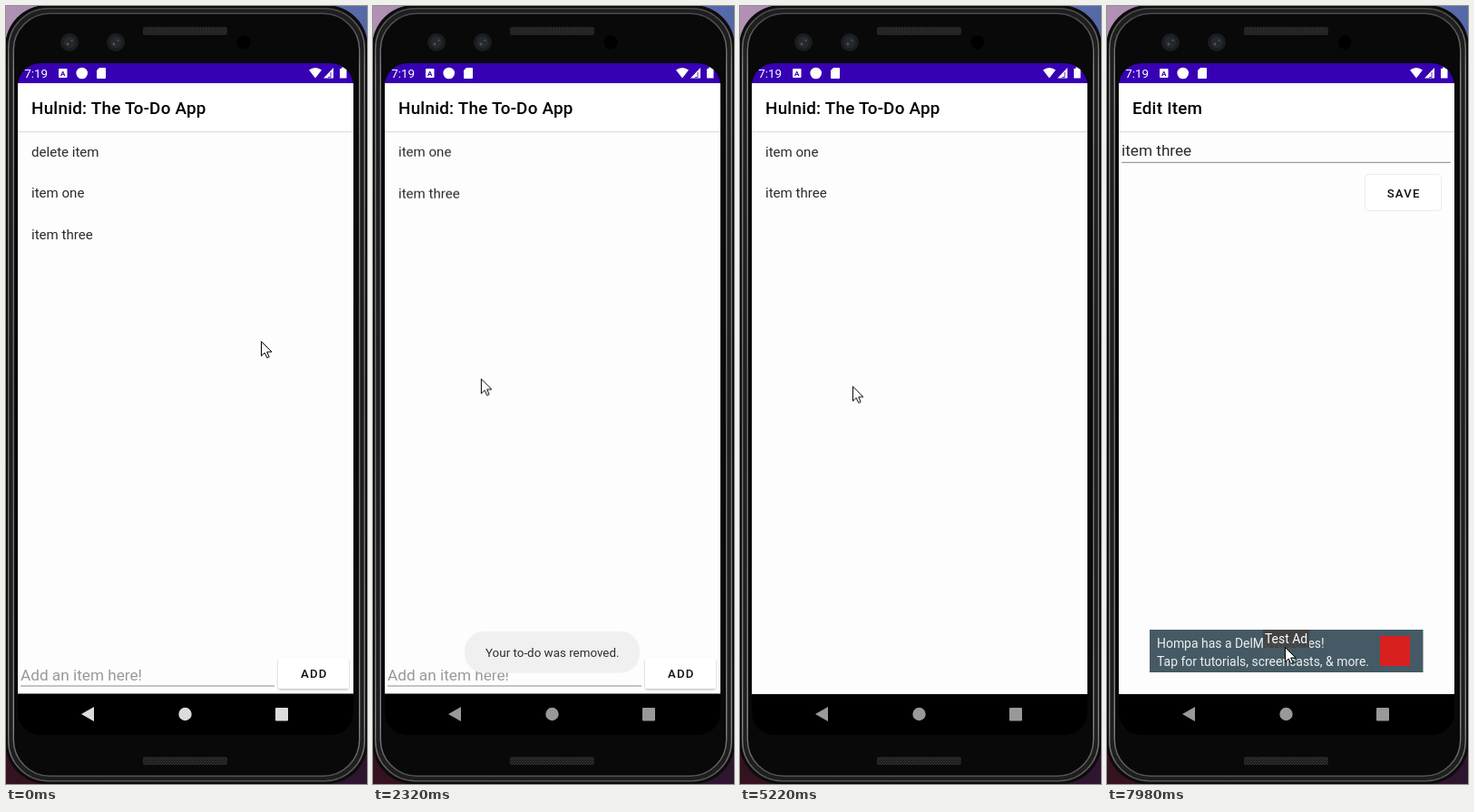
An HTML page for the animation above (8 s loop, 398 px wide and 857 px high).

```html
<!DOCTYPE html>
<html lang="en">
<head>
<meta charset="utf-8">
<title>To-do app</title>
<style>
html, body { margin: 0; width: 100%; height: 100%; overflow: hidden; background: #0a0a0a; }
svg { display: block; width: 398px; height: 857px; font-family: Roboto, sans-serif; }
.title { font-size: 18.84px; font-weight: 500; letter-spacing: .0135em; fill: #000; }
.row { font-size: 15.07px; fill: #2b2b2b; }
.field { font-size: 17.2px; fill: #2b2b2b; }
.hint { fill: #999; }
.button { font-size: 13.2px; font-weight: 500; letter-spacing: 1.18px; fill: #111; }
.small { font-size: 13.4px; }
.ad-copy { font-size: 13.95px; fill: #eceff1; }

#nav, #removed, #rows, #toast, #edit, #ad, #label, #pointer {
  animation: 8s linear infinite;
}
#nav { animation-name: dim; }
#removed { animation-name: remove; }
#rows { animation-name: shift; }
#toast { animation-name: toast; }
#edit { animation-name: open; }
#ad { animation-name: ad; }
#label { animation-name: label; }
#pointer { animation-name: point; animation-timing-function: ease-in-out; }

@keyframes dim {
  0%, 2% { fill: #dcdcdc; }
  11%, 100% { fill: #999; }
}
@keyframes remove {
  0%, 21.1% { opacity: 1; }
  22.3%, 100% { opacity: 0; }
}
@keyframes shift {
  0% { transform: none; }
  22.3% { transform: none; animation-timing-function: cubic-bezier(.37, 0, .63, 1); }
  25.45%, 100% { transform: translateY(-45.3px); }
}
@keyframes toast {
  0%, 21% { opacity: 0; }
  24.4%, 46.5% { opacity: 1; }
  50.5%, 100% { opacity: 0; }
}
@keyframes open {
  0% { opacity: 0; transform: translateY(28px); clip-path: inset(95% 0 0 0); animation-timing-function: step-end; }
  63.75% { opacity: 1; transform: translateY(28px); clip-path: inset(95% 0 0 0); animation-timing-function: cubic-bezier(.2, .5, .1, 1); }
  68.75%, 100% { opacity: 1; transform: none; clip-path: inset(0); }
}
@keyframes ad {
  0% { opacity: 0; animation-timing-function: step-end; }
  76.25%, 100% { opacity: 1; }
}
@keyframes label {
  0% { opacity: 0; animation-timing-function: step-end; }
  77.4%, 100% { opacity: 1; }
}
@keyframes point {
  0%, 3.1% { transform: translate(281px, 369px); }
  13.25% { transform: translate(93px, 163px); }
  14%, 24.7% { transform: translate(93px, 161px); }
  30.9%, 38% { transform: translate(125px, 470px); animation-timing-function: ease-in; }
  40.5% { transform: translate(118px, 428px); animation-timing-function: ease-out; }
  47.5% { transform: translate(79px, 214px); }
  48.6%, 50% { transform: translate(74px, 206px); }
  54.75% { transform: translate(121px, 403px); }
  63.75% { transform: translate(121px, 403px); animation-timing-function: ease-in; }
  69.1% { transform: translate(146px, 537px); animation-timing-function: ease-out; }
  73.6%, 80.5% { transform: translate(188px, 722px); }
  81%, 86.3% { transform: translate(189px, 718px); }
  89% { transform: translate(154px, 710px); }
  91.3% { transform: translate(201px, 704px); }
  93.6% { transform: translate(160px, 706px); }
  96.5% { transform: translate(180px, 708px); }
  98.2% { transform: translate(219px, 707px); }
  99.7%, 100% { transform: translate(196px, 706px); }
}
</style>
</head>
<body>
<svg viewBox="0 0 398 857">
  <defs>
    <linearGradient id="wall-top">
      <stop stop-color="#b291b4"/><stop offset="1" stop-color="#5468a8"/>
    </linearGradient>
    <linearGradient id="wall-bottom">
      <stop stop-color="#35121f"/><stop offset="1" stop-color="#2e1530"/>
    </linearGradient>
    <linearGradient id="metal" x2="0" y2="1">
      <stop stop-color="#4a4a4a"/><stop offset=".08" stop-color="#858585"/>
      <stop offset=".5" stop-color="#6a6a6a"/><stop offset=".93" stop-color="#858585"/>
      <stop offset="1" stop-color="#555"/>
    </linearGradient>
    <pattern id="mesh" width="3" height="3" patternUnits="userSpaceOnUse">
      <rect width="3" height="3" fill="#303030"/>
      <path d="M0 0L3 3M3 0L0 3" stroke="#171717" stroke-width=".8"/>
    </pattern>
    <filter id="lift" x="-10%" y="-20%" width="120%" height="150%">
      <feDropShadow dx="0" dy="1.2" stdDeviation="1.1" flood-opacity=".28"/>
    </filter>
    <clipPath id="screen"><rect x="13" y="63" width="370" height="740" rx="25"/></clipPath>
    <clipPath id="content"><rect x="13" y="85" width="370" height="672.5"/></clipPath>
    <g id="camera">
      <circle r="10" fill="#1b1d20"/>
      <circle r="6.5" fill="#25292e"/>
      <circle cx="-2" cy="2" r="1.4" fill="#4d555d"/>
      <circle cx="2.5" cy="-2" r="1.2" fill="#434a52"/>
    </g>
    <g id="page">
      <rect x="13" y="85" width="370" height="673" fill="#fdfdfd"/>
      <rect x="13" y="85" width="370" height="53" fill="#fff"/>
      <rect x="13" y="138" width="370" height="1.2" fill="#dedede"/>
    </g>
  </defs>

  <!-- phone body -->
  <rect width="398" height="430" fill="url(#wall-top)"/>
  <rect y="430" width="398" height="427" fill="url(#wall-bottom)"/>
  <rect x="-1" y="-1" width="400" height="858" rx="46" fill="#0c0c0c"/>
  <g fill="none" stroke="url(#metal)" stroke-width="1.4">
    <rect x="2.7" y="2.7" width="392.6" height="851" rx="44" fill="#1e1e1e"/>
    <rect x="8.3" y="8.3" width="381.4" height="840" rx="40" fill="#090909"/>
  </g>
  <rect x="151" y="23" width="93" height="9" rx="2" fill="url(#mesh)"/>
  <rect x="151" y="827" width="93" height="9" rx="2" fill="url(#mesh)"/>
  <use href="#camera" x="70" y="40"/>
  <use href="#camera" x="121" y="40"/>
  <circle cx="262" cy="40" r="7.5" fill="#000"/>

  <g clip-path="url(#screen)">
    <rect x="13" y="63" width="370" height="740" fill="#000"/>
    <g clip-path="url(#content)">
      <use href="#page"/>
      <text class="title" x="28" y="118.5">Hulnid: The To-Do App</text>
      <text class="row" id="removed" x="28" y="166">delete item</text>
      <g class="row" id="rows">
        <text x="28" y="211.3">item one</text>
        <text x="28" y="256.6">item three</text>
      </g>
      <text class="field hint" x="16" y="742.5">Add an item here!</text>
      <path d="M16 749H296" stroke="#8a8a8a" stroke-width="1.2"/>
      <rect x="300" y="718" width="78" height="34" rx="3" fill="#fff" filter="url(#lift)"/>
      <text class="button" x="325" y="740">ADD</text>

      <g id="edit">
        <use href="#page"/>
        <text class="title" x="28" y="118.5">Edit Item</text>
        <text class="field" x="16" y="165">item three</text>
        <path d="M16 172.3H379" stroke="#858585"/>
        <rect x="284.5" y="185.5" width="84" height="40" rx="4" fill="#fff" stroke="#ececec"/>
        <text class="button" x="308.7" y="210.5">SAVE</text>
        <g id="ad">
          <rect x="47" y="687" width="301.5" height="47" fill="#455a64"/>
          <g class="ad-copy">
            <text x="55" y="707">Hompa has a DelMovu series!</text>
            <text x="55" y="726.5">Tap for tutorials, screencasts, &amp; more.</text>
          </g>
          <rect x="301" y="694" width="33" height="33" fill="#d8201f"/>
          <g id="label">
            <rect x="172" y="687" width="51" height="20" fill="#424242" fill-opacity=".93"/>
            <text x="174" y="702" font-size="13.9" fill="#fff">Test Ad</text>
          </g>
        </g>
      </g>
    </g>

    <!-- status bar -->
    <rect x="13" y="63" width="370" height="22" fill="#3700b3"/>
    <g fill="#fff">
      <text class="small" x="20.2" y="78.7">7:19</text>
      <rect x="58" y="69" width="9.5" height="10" rx="1"/>
      <text x="60" y="77" font-size="8" font-weight="700" fill="#3700b3">A</text>
      <circle cx="83.7" cy="74" r="6.3"/>
      <path d="M103 68h6q1 0 1 1v10q0 1-1 1h-8q-1 0-1-1v-8z"/>
      <path d="M334 70.5Q341 65.5 348 70.5L341 79.5Z"/>
      <path d="M350 79.5L361 68V79.5Z"/>
      <path d="M358 73V78.5H355" stroke="#3700b3" fill="none" stroke-width=".8"/>
      <path d="M368 69h2v-1.5h3.5V69h2v10.5H368z"/>
    </g>

    <g id="nav">
      <path d="M83 780L97 772V788Z"/>
      <circle cx="197.5" cy="780" r="7.2"/>
      <rect x="297" y="773" width="14" height="14.5" rx="1"/>
    </g>
    <g id="toast">
      <rect x="101" y="689" width="193" height="45.5" rx="21" fill="#f0f0f0"/>
      <text class="small" x="124" y="717" fill="#2e2e2e">Your to-do was removed.</text>
    </g>
  </g>

  <path id="pointer" d="M.5 .5V16.5L4.2 13 6.8 18.6 9.2 17.5 6.7 12H12Z" fill="#fff" stroke="#000"/>
</svg>
</body>
</html>
```
